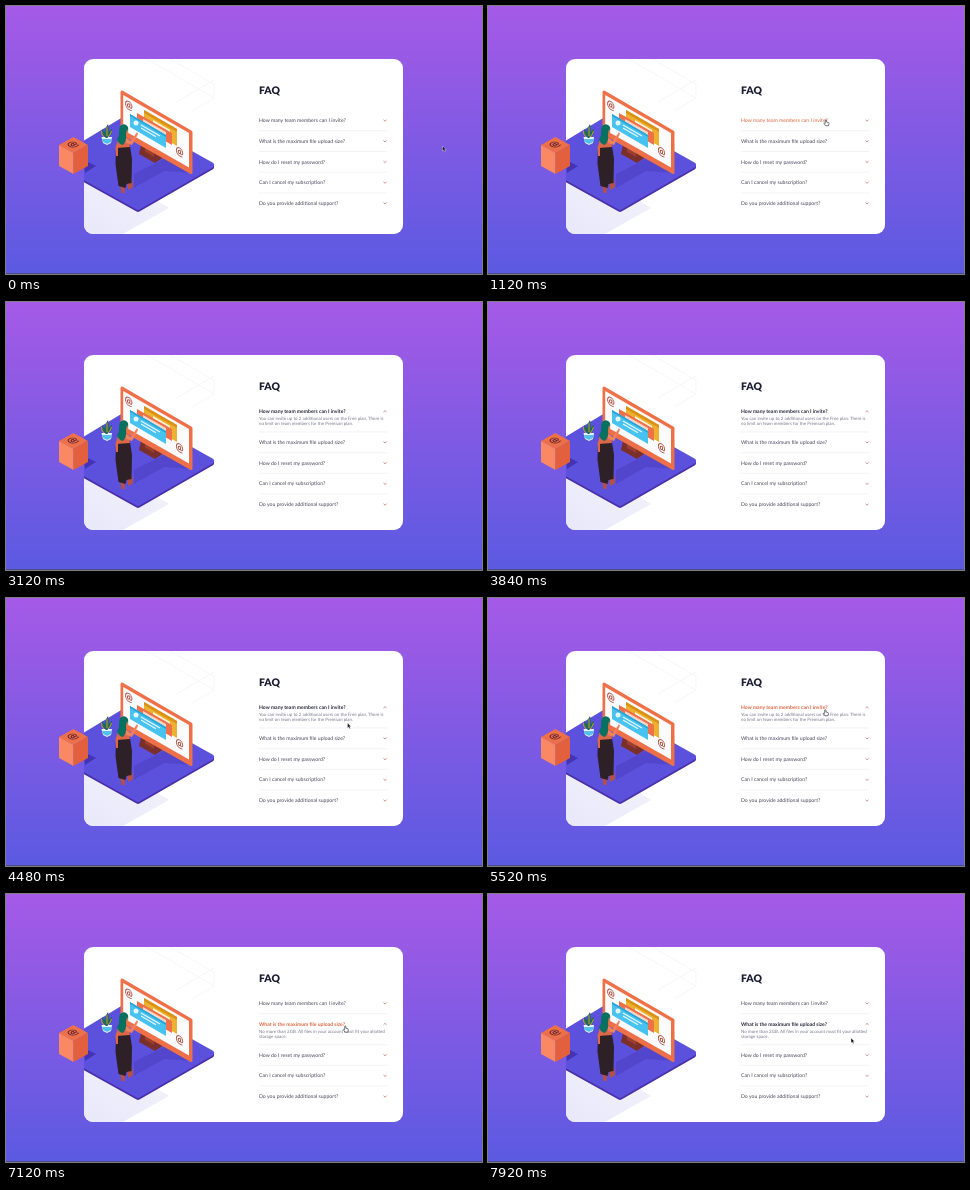
Write an HTML page that moves like this. It is 476 by 268 pixels and loops after 8 s.

```html
<!DOCTYPE html>
<html lang="en">
<head>
<meta charset="utf-8">
<title>FAQ accordion</title>
<style>
  html, body { margin: 0; width: 100%; height: 100%; overflow: hidden; background: #5c5ae0; }
  svg { display: block; width: 100%; height: 100%; }
  text { font-family: Lato, "Open Sans", sans-serif; text-rendering: geometricPrecision; }
  .title { font-size: 10.4px; font-weight: 900; fill: #1c1d33; }
  .question { font-size: 5.15px; fill: #45465a; }
  .open .question { font-weight: 700; font-size: 5.07px; fill: #25263b; }
  .hover .question { fill: #e0653f; }
  .answer { font-size: 4.47px; fill: #777889; visibility: hidden; }
  .open .answer { visibility: visible; }
  .rule { stroke: #e6e6ec; stroke-width: .5; }
  .chevron { fill: none; stroke: #b96a62; stroke-width: .75; }
  .at { font-size: 11px; font-weight: 700; text-anchor: middle; }
</style>
</head>
<body>
<svg viewBox="0 0 476 268" preserveAspectRatio="none">
  <defs>
    <linearGradient id="sky" x2="0" y2="1">
      <stop stop-color="#a55ae6"/><stop offset="1" stop-color="#5b5ae1"/>
    </linearGradient>
    <linearGradient id="mist" x1="0" y1="1" x2="1" y2="0">
      <stop stop-color="#e9e8fa"/><stop offset="1" stop-color="#f3f2fc"/>
    </linearGradient>
    <clipPath id="cardClip"><rect x="78" y="53" width="319" height="175" rx="9"/></clipPath>
  </defs>

  <rect width="476" height="268" fill="url(#sky)"/>
  <rect y="267" width="476" height="1" fill="#4a4a86"/>
  <rect x="78" y="53" width="319" height="175" rx="9" fill="#fff"/>

  <g clip-path="url(#cardClip)">
    <path d="M78 170 133 204 150 194 163 202 117 228H78Z" fill="url(#mist)"/>
    <path d="M164 53 208 78V92L186 105M141 53 208 92M208 74 170 96" fill="none" stroke="#f0f0f4" stroke-width=".6"/>

    <!-- platform -->
    <g stroke-linejoin="round" stroke-width="6">
      <path id="slab" d="M121 112 205 159 132 201 50 155Z" fill="#4a2fa8" stroke="#4a2fa8" transform="translate(0 2)"/>
      <path d="M121 112 205 159 132 201 50 155Z" fill="#5c51dd" stroke="#5c51dd"/>
    </g>
    <path d="M78 154 90 160 79 167Z" fill="#4434b4"/>
    <path d="M128 182 158 165 185 167 160 152 128 168Z" fill="#5246cd"/>
  </g>

  <!-- plant -->
  <path d="M95.5 131 106 131 105 137 101 139 97 137Z" fill="#e9f4fb"/>
  <path d="M96 133 106 133 105 136 101 138 97 136Z" fill="#55bfe9"/>
  <path d="M100 132Q95 129 96 123 101 126 100 132Q98 123 102 118 104 125 101 132Q102 125 106 123 107 129 101 132" fill="#1f6a5a"/>
  <path d="M98 131Q95 128 95.5 125M102 131Q105 128 105.5 125M101 130V121" fill="none" stroke="#d6a52d" stroke-width=".9"/>

  <!-- monitor -->
  <path d="M135 139 146 145 158 151 149 157 133 148Z" fill="#7a2f2b"/>
  <path d="M139 137 148 142 148 151 139 146Z" fill="#9b3e30"/>
  <g stroke-linejoin="round">
    <path d="M116 86 185 126V166.5L116 127.5Z" fill="#ee7048" stroke="#ee7048" stroke-width="3"/>
    <path d="M117.2 89 183 127V161.5L117.2 124Z" fill="#fbfafd"/>
  </g>
  <path d="M138 104 171 123V140L138 121Z" fill="#eeb02f"/>
  <path d="M138 104 171 123V126L138 107Z" fill="#d89219"/>
  <path d="M147 114 164 124V131L147 121Z" fill="#fff4dc"/>
  <path d="M131 107 166 127V139L131 119Z" fill="#ee7048"/>
  <path d="M137 113 160 126V130L137 117Z" fill="#ffd5c6"/>
  <path d="M124 108 160 129V142L124 121Z" fill="#48c2ef"/>
  <path d="M124 108 160 129V131L124 110Z" fill="#2aa5da"/>
  <path d="M135 119 154 130M135 122 150 130.7" stroke="#e6f8ff" stroke-width="1.2"/>
  <circle cx="130" cy="117" r="2.5" fill="#e6f8ff"/>
  <g class="at" fill="#a94a35">
    <text transform="matrix(.86 .5 0 1 122.7 102.5)">@</text>
    <text transform="matrix(.86 .5 0 1 173.5 149)">@</text>
  </g>

  <!-- woman -->
  <path d="M114 176 119 177 118.5 187 115.5 187ZM121 173 126 173 127 181 122 184Z" fill="#b9503e"/>
  <path d="M110 140Q117 137 124 140L126 153 125.5 177 120.5 178 119.5 182 112.5 180 109.5 158Z" fill="#2e2027"/>
  <path d="M112 133 122 131 124 141 110 142Z" fill="#dd6746"/>
  <path d="M120 132 125 135 131 126 132 128 126 139 120 137Z" fill="#ed8160"/>
  <path d="M113 133 109.5 141 110 150 112 150 112 142 115 137Z" fill="#dd6746"/>
  <path d="M114 120Q119 116 122 121 123 126 120 128 121 135 117 139 112 138 111 133 114 129 113 124Z" fill="#08705f"/>
  <path d="M121 123 122.5 126 120 128Z" fill="#dd7a58"/>

  <!-- box -->
  <path d="M53 139 67.5 131 82 139 67.5 147Z" fill="#ee7049"/>
  <path d="M53 139 67.5 147V168L53 160Z" fill="#fa8862"/>
  <path d="M82 139 67.5 147V168L82 160Z" fill="#e2603d"/>
  <text class="at" fill="#572033" transform="matrix(.86 -.46 .86 .46 69.5 140)">@</text>

  <text class="title" x="253" y="88.4">FAQ</text>
  <g id="list"></g>

  <g id="arrow">
    <path d="M0 0V5L1.2 4 2 5.7 2.9 5.3 2.1 3.6H3.6Z" fill="#15151c" stroke="#fff" stroke-width=".35"/>
  </g>
  <g id="hand">
    <path d="M-.7 0Q0 -.6 .6 0V2L2.6 2.5Q3.2 2.8 3 3.7L2.4 5.8H-.4L-2 3.4Q-1.9 2.6-.7 3.3Z" fill="#fff" stroke="#22222b" stroke-width=".6"/>
  </g>
</svg>

<script>
const LOOP = 8000, STEP = 80;
const PITCH = 20.7, FIRST_Y = 114.5, SHIFT = 5.15;

const items = [
  ["How many team members can I invite?",
    "You can invite up to 2 additional users on the Free plan. There is",
    "no limit on team members for the Premium plan."],
  ["What is the maximum file upload size?",
    "No more than 2GB. All files in your account must fit your allotted",
    "storage space."],
  ["How do I reset my password?"],
  ["Can I cancel my subscription?"],
  ["Do you provide additional support?"]
];

// Spans of [start, end, row]
const opened = [[1520, 5600, 0], [7040, 8000, 1]];
const hovered = [[880, 2480, 0], [5120, 6000, 0], [6560, 7520, 1]];
// The pointer blends into the answer text during this span.
const hidden = [[2480, 4080, 0]];

// Pointer stops: [time, x, y]
const pointer = [
  [80, 436.5, 140], [880, 338, 114], [2240, 338, 114.5], [2560, 340, 119],
  [4000, 341, 123], [4480, 341.5, 125], [4800, 341.5, 125], [5200, 338, 112],
  [5760, 337, 112], [6160, 330, 109.5], [6240, 330, 110], [6720, 338, 133],
  [7360, 340, 132], [7840, 363, 144]
];

const byId = id => document.getElementById(id);
const active = (spans, t) => {
  const span = spans.find(([start, end]) => t >= start && t < end);
  return span ? span[2] : -1;
};

byId("list").innerHTML = items.map(([question, ...answer], i) => `<g>
  <text class="question" x="253" y="1.7">${question}</text>
  ${answer.map((line, n) => `<text class="answer" x="253" y="${8.9 + n * 5.1}">${line}</text>`).join("")}
  <path class="chevron" d="M-1.5 -.7 0 .7 1.5 -.7"/>
  ${i < items.length - 1 ? '<path class="rule" d="M253 0H381"/>' : ""}
</g>`).join("");
const rows = [...byId("list").children];

function pointerAt(t) {
  const next = pointer.findIndex(stop => stop[0] > t);
  if (next === 0) return pointer[0].slice(1);
  if (next < 0) return pointer[pointer.length - 1].slice(1);
  const [t0, x0, y0] = pointer[next - 1], [t1, x1, y1] = pointer[next];
  const u = (t - t0) / (t1 - t0), ease = u * u * (3 - 2 * u);
  return [x0 + (x1 - x0) * ease, y0 + (y1 - y0) * ease];
}

function draw(t) {
  const open = active(opened, t), hover = active(hovered, t);
  rows.forEach((row, i) => {
    const isOpen = i === open;
    const offset = open < 0 ? 0 : i <= open ? -SHIFT : SHIFT;
    row.setAttribute("transform", `translate(0 ${FIRST_Y + i * PITCH + offset})`);
    row.classList.toggle("open", isOpen);
    row.classList.toggle("hover", i === hover);
    row.querySelector(".chevron").setAttribute("transform", `translate(379 0) rotate(${isOpen ? 180 : 0})`);
    row.querySelector(".rule")?.setAttribute("transform", `translate(0 ${isOpen ? 10.3 + 2 * SHIFT : 10.3})`);
  });

  const [x, y] = pointerAt(t), isHidden = active(hidden, t) >= 0;
  for (const [id, shown] of [["arrow", hover < 0], ["hand", hover >= 0]]) {
    byId(id).setAttribute("transform", `translate(${x} ${y})`);
    byId(id).setAttribute("visibility", shown && !isHidden ? "visible" : "hidden");
  }
}

const start = performance.now();
function tick() {
  const t = (performance.now() - start) % LOOP;
  draw(Math.floor(t / STEP) * STEP);
  requestAnimationFrame(tick);
}
tick();
</script>
</body>
</html>
```
